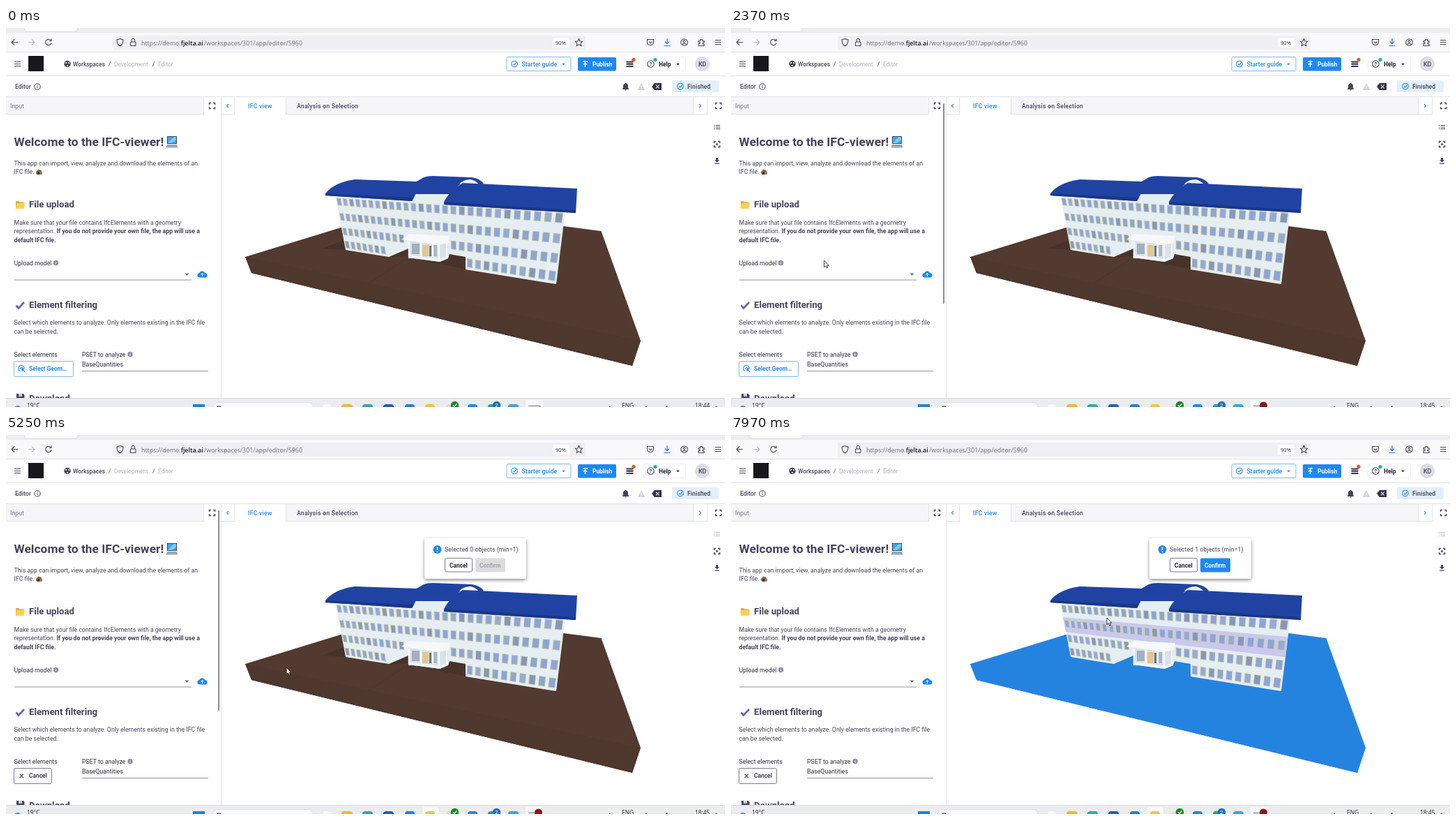
These frames come from a looping animation (1031 px wide and 543 px high, 8 s). An HTML page:

```html
<!DOCTYPE html>
<html lang="en">
<head>
<meta charset="utf-8">
<title>Building viewer</title>
<style>
html, body { margin: 0; width: 100%; height: 100%; overflow: hidden; background: #fff; }
svg { display: block; width: 1031px; height: 543px; }
text { font: 8.75px Roboto, sans-serif; fill: #45425e; white-space: pre; }
.m { font-weight: 500; }
.b { font-weight: 700; }
.h1 { font-size: 17.4px; font-weight: 700; }
.h2 { font-size: 13.2px; font-weight: 700; }
.crumb { font-size: 8.35px; }
.tab { font-size: 8.7px; font-weight: 500; letter-spacing: .24px; }
.btn { font-size: 8.4px; font-weight: 600; }
.url { font: 8.9px "Open Sans", sans-serif; fill: #6b6b73; }
.sys { font: 8.4px "Open Sans", sans-serif; fill: #222; }
.ln { fill: none; stroke: #45425e; stroke-width: 1.1; }
.blue { fill: none; stroke: #1e88f5; stroke-width: 1.1; }
.box { fill: none; stroke: #7d7b90; stroke-width: 1; }
.rule { stroke: #e2e2e8; stroke-width: 1; }
.field { stroke: #94939c; }
#top { fill: #523a30; }
#side { fill: #4e372d; }
.hover #top { fill: #533650; }
.hover #side { fill: #50354e; }
.picked #top, .picked #side { fill: #2583e0; }
.picked #shade { display: none; }
</style>
</head>
<body>
<svg viewBox="0 0 1031 543" xmlns="http://www.w3.org/2000/svg">
<defs>
  <filter id="shadow" x="-15%" y="-25%" width="130%" height="160%"><feDropShadow dx="0" dy="2" stdDeviation="2.600" flood-opacity=".45"/></filter>
  <path id="expand" class="ln" d="M-4-1.5V-4H-1.5M1.5-4H4V-1.5M4 1.5V4H1.5M-1.5 4H-4V1.5" style="stroke-width:1.4"/>
  <g id="info"><circle r="3.7" fill="#8b89a5"/><path d="M0-.6V2M0-2.1V-1.2" stroke="#fff"/></g>
  <path id="caret" d="M-3-1.5H3L0 1.7Z"/>
</defs>
<rect width="1031" height="543" fill="#fff"/>

<!-- browser bar -->
<rect width="1031" height="7" fill="#ededf1"/>
<rect y="7" width="1031" height="27" fill="#f9f9fb"/>
<rect x="27" y="-5" width="75" height="10" rx="2" fill="#fff" stroke="#cfcfd6" stroke-width=".7"/>
<path class="rule" d="M0 34.5H1031"/>
<rect x="153" y="11" width="678" height="20" rx="2" fill="#f0f0f4"/>
<g fill="none" stroke="#45454c" stroke-width="1.1">
  <path d="M17 20.500H8M12 16.500L8 20.500 12 24.500"/>
  <path d="M32 20.500H41M37 16.500L41 20.500 37 24.500" stroke="#b9b9c0"/>
  <path d="M64 17.500A4.200 4.200 0 1 0 65 21.500M65 15.500V18.500H62"/>
  <path d="M163.500 15.500L168 17C168 21 167 24 163.500 26 160 24 159 21 159 17Z"/>
  <rect x="178.500" y="20" width="7.500" height="5.500" rx="1"/><path d="M180 20V17.500a2.200 2.200 0 0 1 4.400 0V20"/>
  <path d="M821.500 15.500L823 19 826.500 19.300 824 22 824.800 25.500 821.500 23.600 818.200 25.500 819 22 816.500 19.300 820 19Z"/>
  <path d="M919.500 16.500H928.500V20C928.500 26 919.500 26 919.500 20ZM921.800 19.500L924 21.600 926.200 19.500"/>
  <path d="M948 15V22M945 19.500L948 22.500 951 19.500M943.500 25.500H952.500" stroke="#1676e8"/>
  <circle cx="972.500" cy="20.500" r="4.800"/><circle cx="972.500" cy="19" r="1.500"/><path d="M969.500 23.700Q972.500 20.500 975.500 23.700"/>
  <path d="M993 18.500H995.500V16.500H998.500V18.500H1001V21H999V23H1001V25.500H993V22.500H995V20.500H993Z"/>
  <path d="M1017 17.500H1025M1017 20.500H1025M1017 23.500H1025"/>
</g>
<text class="url" x="194" y="24.500">https://demo.<tspan font-weight="600" fill="#18181c">fjelta.ai</tspan><tspan x="284">/workspaces/301/app/editor/5960</tspan></text>
<rect x="784" y="14" width="24" height="14" rx="2" fill="#fff"/>
<text class="sys" x="788" y="24" style="font-size:7.600px">90%</text>

<!-- app header -->
<path class="rule" d="M0 68.500H1031M0 98.500H1031"/>
<path class="ln" d="M12 48.500H21M12 51.500H21M12 54.500H21"/>
<rect x="32" y="40" width="22" height="22" fill="#17171c"/>
<circle cx="88" cy="51.500" r="4.700" fill="#45425e"/><path d="M86 50h.1M90 50h.1M88 54h.1" stroke="#fff" stroke-width="2" stroke-linecap="round"/>
<text class="crumb m" x="96" y="54.500">Workspaces</text>
<text class="crumb" x="147" y="54.500">/</text>
<text class="crumb" x="155" y="54.500" style="fill:#b3b2c0">Development</text>
<text class="crumb" x="210" y="54.500">/</text>
<text class="crumb" x="218" y="54.500" style="fill:#b3b2c0">Editor</text>
<rect x="718" y="41.500" width="92" height="20" rx="2" class="blue" style="stroke:#7cb8f8;stroke-width:1"/>
<circle class="blue" cx="729" cy="51.500" r="4.300"/><path class="blue" d="M727 51.500L728.500 53 731.500 50"/>
<text class="m" x="739.500" y="54.600" style="fill:#1e88f5">Starter guide</text>
<use href="#caret" transform="translate(799.500 52) scale(.8)" fill="#1e88f5"/>
<rect x="820" y="42" width="55" height="19.500" rx="2" fill="#1e88f5"/>
<path d="M827 48H834M830.500 56V50M828 52.500L830.500 50 833 52.500" stroke="#fff" stroke-width="1.300" fill="none"/>
<text class="btn" x="841" y="54.600" style="fill:#fff">Publish</text>
<path d="M889.500 48.500H899.500M889.500 51.700H899.500M889.500 55H899.500" stroke="#35324c" stroke-width="2.200"/>
<circle cx="900" cy="45.500" r="2.700" fill="#d4622a"/>
<rect x="913.500" y="41.500" width="61" height="20" rx="2" fill="#fff" stroke="#f0f0f4"/>
<circle class="ln" cx="924.500" cy="51.500" r="4.700"/><text class="b" x="922.400" y="54.400" style="font-size:7.500px">?</text>
<circle cx="931" cy="45.500" r="2.600" fill="#16b58e"/>
<text class="btn" x="936" y="54.600" style="fill:#24223a">Help</text>
<use href="#caret" transform="translate(963.500 52) scale(.8)" fill="#24223a"/>
<circle cx="998.500" cy="51.500" r="10.500" fill="#dcdce6"/><text class="m" x="993" y="54.600">KD</text>
<text class="m" x="13" y="87">Editor</text>
<circle class="ln" cx="45" cy="84" r="4.200"/><path class="ln" d="M45 83.500V86.300M45 81.500V82.500"/>
<path d="M884 88V87L885 86V82.500Q885.500 79.500 888.500 79Q891.500 79.500 892 82.500V86L893 87V88ZM887 88.600H890L888.500 90Z" fill="#45425e"/>
<path d="M911 79L916.500 89H905.500Z" fill="#d3d3dc"/><path d="M911 82.500V86M911 87V88" stroke="#fff"/>
<path d="M926 84L930 79H940V89H930Z" fill="#35324c"/><path d="M932 81.700L936.600 86.300M936.600 81.700L932 86.300" stroke="#fff" stroke-width="1.100"/>
<rect x="955" y="75" width="67" height="17" rx="2" fill="#e3effc"/>
<circle class="blue" cx="967" cy="83.500" r="4.300"/><path class="blue" d="M965 83.500L966.500 85 969.500 82"/>
<text class="m" x="977" y="87">Finished</text>

<!-- panel headers -->
<rect y="99" width="283" height="25" fill="#f6f6f9"/>
<rect x="401" y="99" width="584" height="25" fill="#f6f6f9"/>
<path class="rule" d="M0 123.500H283M308 123.500H328M401 123.500H1006M283.500 99V124M308.500 99V530M327.500 99V124M401.500 99V124M985.500 99V124M1005.500 99V124"/>
<text x="6" y="114.600" style="fill:#77758c">Input</text>
<use href="#expand" x="295.500" y="111.500"/><use href="#expand" x="1021.500" y="111.500"/>
<path class="blue" d="M319 109L316.500 111.500 319 114M994 109L996.500 111.500 994 114"/>
<text class="tab" x="347" y="114.600" style="fill:#1e88f5">IFC view</text>
<text class="tab" x="417" y="114.600">Analysis on Selection</text>
<path id="listIcon" class="ln" d="M1015 139.500H1016.300M1017.500 139.500H1024M1015 142H1016.300M1017.500 142H1024M1015 144.500H1016.300M1017.500 144.500H1024"/>
<use href="#expand" x="1019.500" y="166.500"/><circle cx="1019.500" cy="166.500" r="1.500" fill="#45425e"/>
<path d="M1018 186H1021V189H1023L1019.500 192.500 1016 189H1018ZM1016 193.500H1023V194.800H1016Z" fill="#45425e"/>

<!-- form -->
<text class="h1" x="11.500" y="169">Welcome to the IFC-viewer!</text>
<path d="M231 155H245V166H231Z" fill="#3b4560"/><path d="M232 156H244V165H232Z" fill="#3fa8e8"/><path d="M232 165L241 156H244V160L238 165Z" fill="#7dcbf4"/><path d="M231 167H245L246.500 171.500H229.500Z" fill="#9aa5b6"/>
<text x="11.500" y="196.500">This app can import, view, analyze and download the elements of an</text>
<text x="11.500" y="209">IFC file.</text>
<path d="M42.500 207L46 202.500 50 203.500 52.500 208 50 210H44Z" fill="#8a6a50"/><path d="M45 206H48V210H45Z" fill="#453830"/><circle cx="50.500" cy="208.500" r="1.500" fill="#a9826a"/>
<path d="M14 248H18L19.500 249.500H25.500V258.500H14Z" fill="#eda92c"/><path d="M15 251H27L26 258.500H14Z" fill="#ffd056"/>
<text class="h2" x="33" y="257">File upload</text>
<text x="11.500" y="281.700">Make sure that your file contains IfcElements with a geometry</text>
<text x="11.500" y="294.200">representation. <tspan class="b">If you do not provide your own file, the app will use a</tspan></text>
<text class="b" x="11.500" y="306.700">default IFC file.</text>
<text x="11.500" y="339.700" style="fill:#2c2a40">Upload model</text><use href="#info" x="71.500" y="336.500"/>
<path id="underline" class="field" d="M12 361H266"/>
<use href="#caret" x="259.500" y="353" fill="#6b6a74"/>
<path d="M277.500 357.500A3.300 3.300 0 0 1 277 351A4.700 4.700 0 0 1 285.500 351A3.300 3.300 0 0 1 286 357.500Z" fill="#1e88f5"/><path d="M281.500 356V352M279.500 353.500L281.500 351.500 283.500 353.500" stroke="#fff" fill="none"/>
<path d="M14.500 397.500L18 401.500 26 393" fill="none" stroke="#6761b4" stroke-width="2.700"/>
<text class="h2" x="33" y="400.500">Element filtering</text>
<text x="11.500" y="425">Select which elements to analyze. Only elements existing in the IFC file</text>
<text x="11.500" y="437.500">can be selected.</text>
<text x="11.500" y="470.500" style="fill:#2c2a40">Select elements</text>
<text x="109" y="470.500" style="fill:#2c2a40">PSET to analyze</text><use href="#info" x="178" y="467.500"/>
<text x="109" y="485" style="fill:#2c2a40">BaseQuantities</text>
<path class="field" d="M109 491.500H290"/>
<g id="selectBtn">
  <rect x="11.500" y="477.500" width="85" height="22" rx="2" class="blue" style="stroke:#7cb8f8;stroke-width:1"/>
  <path class="blue" d="M20 491.500A4.200 4.200 0 1 1 26.200 488M20.500 489A2 2 0 1 1 24.500 488M22.500 488L27 492.500M22.500 488L23.500 492M22.500 488L26.500 489"/>
  <text class="btn" x="33" y="491.400" style="fill:#1e88f5">Select Geom…</text>
</g>
<g id="cancelBtn">
  <rect x="11.500" y="477.500" width="54" height="22" rx="2" class="box"/>
  <path class="ln" d="M19.500 485.700L25 491.200M25 485.700L19.500 491.200"/>
  <text class="btn" x="33" y="491.400">Cancel</text>
</g>
<path d="M15 524H25L26.500 526V536H15Z" fill="#45425e"/><path d="M18 524H23V528H18Z" fill="#c9c8dc"/>
<text class="h2" x="33" y="535">Download</text>
<rect id="bar" x="304" y="108" width="2.200" height="287" rx="1" fill="#919197"/>
<path id="spin" class="blue" d="M70 46.500A5 5 0 1 1 65 51.500" style="stroke-width:1.500"/>

<!-- model -->
<g id="ground">
  <path id="top" d="M343 328L480 286 800 284 853.500 291 910 448 898 484 352 351Z"/>
  <path id="side" d="M343 328L910 448 898 484 352 351Z"/>
  <g id="shade">
    <path d="M453 316L487 303V318Z" opacity=".14"/>
    <path d="M520 366L572 332 578 333" fill="none" stroke="#000" stroke-opacity=".1"/>
    <path d="M549 329L577 315V329L660 346V326L634 322Z" opacity=".12"/>
  </g>
</g>
<path d="M472 239L583 247 590 234H636L632 250 802 262 789 367 659 346V328L636 324 634 330H577V316L549 328 487 318Z" fill="#e5eef3"/>
<path id="floor" fill="#c9c8ee"/>
<path id="slab" fill="#cfc8ee"/>
<g id="windows" stroke="#ddd29a" stroke-width=".8"></g>
<path d="M577 305L634 308V330L622 335 577 329Z" fill="#d9e2e8"/>
<path d="M582 309H593V324H582Z" fill="#a3b0c2"/><path d="M597 311H606V327H597Z" fill="#e2c78b"/><path d="M607 312H610V327H607Z" fill="#6b7582"/><path d="M613 311H618V327H613Z" fill="#aab6c6"/>
<path d="M578 306V329M595 307V328M612 308V328M621 308V334M632 308V330" stroke="#f4f8fa" stroke-width="2.500"/>
<path d="M577 325L622 331 634 326V330L622 335 577 329Z" fill="#f2f6f8"/>
<path id="canopy" d="M567 303L578 295 637 298 634 308 620 311Z"/>
<path d="M587 221L599 214Q604 212 612 212L668 214Q680 216 685 223L680 226Q672 218 664 218L652 223 636 238H580Z" fill="#2043a3"/>
<path d="M650 223Q658 216 667 217Q674 219 677 223Z" fill="#eef3f6"/>
<path d="M458 237Q471 221 500 217L590 220 588 237 586 241 582 248 458 240Z" fill="#2043a3"/>
<path d="M458 237L585 243 582 248 458 240Z" fill="#193789"/>
<path d="M628 249Q637 232 655 222L819 230 817 265 628 253Z" fill="#2043a3"/>
<path d="M628 249L817 261V265L628 253Z" fill="#193789"/>

<!-- selection prompt -->
<g id="prompt">
  <rect x="600" y="148" width="146" height="58" rx="3" fill="#fff" filter="url(#shadow)"/>
  <circle cx="618.500" cy="164" r="6" fill="#1e88f5"/><path d="M618.500 160.500V165M618.500 166.500V168" stroke="#fff" stroke-width="1.400"/>
  <text id="count" x="629" y="167.200" style="letter-spacing:.06px"></text>
  <rect x="629.500" y="176.500" width="39" height="19.500" rx="2" class="box"/>
  <text class="btn" x="636" y="189.600" style="fill:#24223a">Cancel</text>
  <rect id="okBox" x="673" y="176.500" width="43" height="20" rx="2"/>
  <text id="okText" class="btn" x="679" y="189.600">Confirm</text>
</g>

<!-- taskbar -->
<rect y="530" width="1031" height="13" fill="#ebecef"/><path d="M0 530.500H1031" stroke="#d8d9dd"/>
<circle cx="17" cy="546" r="5" fill="#3c8ee0"/>
<text class="sys" x="30" y="544">19°C</text>
<rect x="268" y="539" width="17" height="8" fill="#1a86d8"/>
<rect x="296" y="536.500" width="145" height="20" rx="8" fill="#fafafc" stroke="#d5d6da" stroke-width=".7"/>
<circle cx="305.500" cy="546" r="4" fill="none" stroke="#333" stroke-width="1.200"/>
<rect id="tile" x="597" y="533" width="23" height="14" rx="2" fill="#fafafc"/>
<rect x="745" y="533" width="25" height="14" rx="2" fill="#f9f9fb"/>
<g id="apps"></g>
<circle cx="643.500" cy="540.500" r="5.700" fill="#138a22"/><path d="M641 540.500L643 542.500 646.500 538.500" fill="none" stroke="#fff" stroke-width="1.200"/>
<circle cx="703.500" cy="540.500" r="5.700" fill="#1470c4"/><text x="701.300" y="543.400" style="font-size:8px;fill:#fff">2</text>
<path d="M749 541.500H766V545" fill="none" stroke="#777"/>
<circle id="badge" cx="763.500" cy="541" r="5.500" fill="#8d1616"/>
<path d="M863 544Q865.500 541 868 544M915 544Q918 541 921 544M945 544L948 541.500V544M1016 544Q1018.500 540.500 1021 544" fill="none" stroke="#444"/>
<text class="sys" x="883" y="544">ENG</text>
<text class="sys" id="clock" x="988" y="544"></text>

<path id="arrow" d="M0 0V9.600L2.200 7.600 3.600 10.900 5.300 10.200 3.900 7.100H6.800Z" fill="#fff" stroke="#111" stroke-width=".8"/>
<path id="hand" d="M2.500 6.500V1Q3.500-.5 4.500 1V5Q5.500 4 6.300 5.300Q7.500 4.500 8.100 5.800Q9.500 5.500 9.500 7V9.500L8.500 12.500H3.500L.3 8.200Q.2 6.600 2.500 8Z" fill="#fff" stroke="#111" stroke-width=".8"/>
</svg>
<script>
const $ = id => document.getElementById(id);
const LOOP = 8000, BAYS = 28;
const mix = (a, b, k) => a + (b - a) * k;

// Facade point: u runs along the wall in perspective, v runs down it.
function wall(u, v) {
  const k = u / (u + 1.36 * (1 - u));
  return [mix(mix(472, 487, v), mix(802, 789, v), k), mix(mix(241, 318, v), mix(262, 367, v), k)];
}
const quad = (u0, u1, v0, v1) =>
  "M" + [[u0, v0], [u1, v0], [u1, v1], [u0, v1]].map(p => wall(...p).map(n => n.toFixed(1))).join("L") + "Z";

const gaps = [null, null, [570, 637], [548, 659]];
const tints = ["#8ba5d6", "#8ba5d6", "#93abd8", "#8ba5d6", "#8497bd"];
let panes = "";
[.1, .38, .65, .895].forEach((v, row) => {
  for (let i = 0; i < BAYS; i++) {
    const u = (i + .5) / BAYS, x = wall(u, v)[0], gap = gaps[row];
    if (gap && x > gap[0] && x < gap[1]) continue;
    const tint = tints[(i * 7 + row * 3) % 5];
    panes += `<path d="${quad(u - .0115, u + .0115, v - .066, v + .066)}" fill="${tint}"/>`;
  }
});
$("windows").innerHTML = panes;
$("floor").setAttribute("d", quad(0, 1, .26, .535));
$("slab").setAttribute("d", quad(0, 1, .49, .55));

// Taskbar tiles: left, width, colour.
$("apps").innerHTML = [
  [454, 12, "#fafafa"], [481, 16, "#f2b632"], [511, 15, "#2cabb0"], [541, 15, "#1f62b4"], [572, 14, "#1c83d8"],
  [601, 14, "#f5c344"], [632, 8, "#d9dce2"], [662, 14, "#2489d6"], [691, 9, "#29a08a"], [720, 15, "#35a6e2"]
].map(([x, w, c]) => `<rect x="${x}" y="539" width="${w}" height="12" rx="4" fill="${c}"/>`).join("");

// Pointer path: time, x, y.
const path = [
  [30, 706, 505], [230, 706, 505], [300, 660, 487], [400, 660, 487], [820, 620, 426], [1130, 620, 426],
  [1370, 273, 301], [1600, 273, 301], [2440, 121, 336], [2520, 120, 335], [3320, 120, 335],
  [3600, 67, 481], [3870, 69, 481], [4680, 69, 481], [5250, 402, 333], [5500, 430, 359],
  [5700, 430, 359], [5780, 422, 351], [5880, 430.500, 359], [6130, 430.500, 359], [6480, 532, 244],
  [6950, 530, 236], [7150, 530, 225], [7600, 537, 254], [7780, 538, 260], [7970, 539, 262], [LOOP, 539, 262]
];
function pointer(t) {
  const i = path.findIndex(p => p[0] > t);
  if (i < 1) return null;
  const [a, b] = [path[i - 1], path[i]], k = (t - a[0]) / (b[0] - a[0]);
  return [mix(a[1], b[1], k), mix(a[2], b[2], k)];
}

const show = (id, on) => { $(id).style.display = on ? "" : "none"; };
const within = (t, a, b) => t >= a && t < b;

function draw(t) {
  const picked = t >= 6050, asking = t >= 4180, armed = t >= 4020;
  $("ground").setAttribute("class", picked ? "picked" : t >= 5500 ? "hover" : "");
  const slab = within(t, 6400, 7300);
  show("slab", slab);
  show("floor", t >= 7300);
  $("canopy").setAttribute("fill", slab ? "#d6ccec" : "#f6f8f9");

  show("selectBtn", !armed);
  show("cancelBtn", armed);
  show("tile", armed);
  show("prompt", asking);
  $("listIcon").style.opacity = asking ? .35 : 1;
  $("count").textContent = `Selected ${picked ? 1 : 0} objects (min=1)`;
  $("okBox").style.fill = picked ? "#1e88f5" : "#dcdcdf";
  $("okText").style.fill = picked ? "#fff" : "#a5a5aa";

  $("bar").style.opacity = t < 7780 ? Math.max(0, Math.min(1, (t - 1520) / 180)) : Math.max(0, 1 - (t - 7780) / 180);
  $("underline").style.stroke = within(t, 3390, 3480) ? "#2c2a40" : "";
  show("spin", within(t, 2800, 3240));
  $("spin").setAttribute("transform", `rotate(${Math.floor((t - 2800) / 110) * 85} 70 51.500)`);
  $("clock").textContent = t < 640 ? "18:44" : "18:45";
  show("badge", t >= 640);

  const at = pointer(t), onButton = within(t, 3560, 4780);
  show("arrow", at && !onButton);
  show("hand", at && onButton);
  if (at) $(onButton ? "hand" : "arrow").setAttribute("transform", `translate(${at[0].toFixed(1)} ${at[1].toFixed(1)})`);
}

const start = performance.now();
function tick() {
  draw((performance.now() - start) % LOOP);
  requestAnimationFrame(tick);
}
tick();
</script>
</body>
</html>
```
